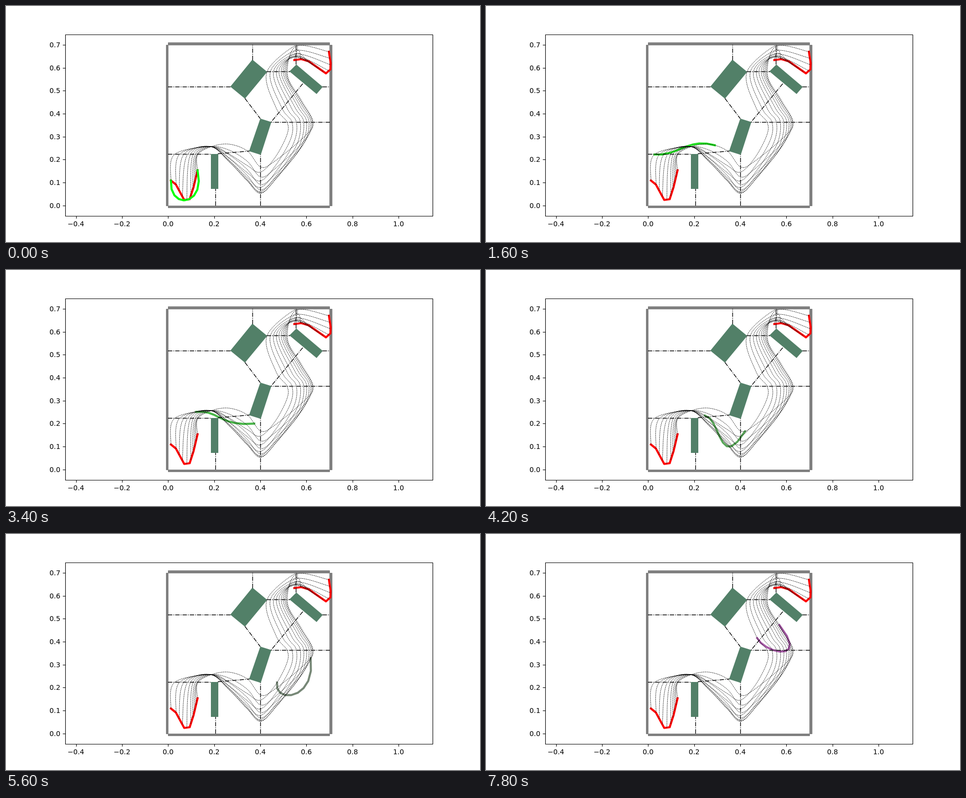
An HTML page with a canvas that plays this animation: 960 by 480 pixels, repeating every 8 s.

```html
<!DOCTYPE html>
<html lang="en">
<head>
<meta charset="utf-8">
<title>Rope path planning</title>
<style>
html, body { margin: 0; width: 100%; height: 100%; overflow: hidden; background: #fff; }
canvas { display: block; width: 100%; height: 100%; }
</style>
</head>
<body>
<canvas id="stage" width="960" height="480"></canvas>
<script>
const ctx = document.getElementById('stage').getContext('2d');
const LOOP = 8000, STEP = 200, COUNT = 10;
const PT = 100 / 72;

const range = (n, f) => Array.from({ length: n }, (_, i) => f(i));
const pairs = a => range(a.length / 2, i => [a[2 * i], a[2 * i + 1]]);
const mix = (a, b, p) => a + (b - a) * p;
const mixPt = (a, b, p) => a.map((v, i) => mix(v, b[i], p));
const snap = v => Math.floor(v + 0.5) + 0.5;
const dataX = v => 328.25 + v * 466.8;
const dataY = v => 405.8 - v * 466.8;

const SIZE = 0.7, WALL = 0.01;
const walls = [[-WALL, 0, 0, SIZE], [SIZE, 0, SIZE + WALL, SIZE],
  [0, SIZE, SIZE, SIZE + WALL], [0, -WALL, SIZE, 0]];

const obstacles = [
  [499, 109, 529, 134, 484, 188.5, 454.3, 164],
  [588, 119, 641.5, 164.5, 629, 179, 574, 133],
  [515, 229, 537.5, 236, 516, 302.7, 492.3, 295.3],
  [415, 301, 430, 301, 430, 372, 415, 372]
].map(pairs);

const passages = [
  [499.5, 110, 499.5, 79], [328, 164.5, 455, 164.5], [484, 188, 515, 229],
  [528, 133.5, 575, 133.5], [587.5, 119, 587.5, 79], [641, 164.5, 656, 164.5],
  [601, 158, 537, 236], [656, 236.5, 537, 236.5], [515.5, 406, 515.5, 302],
  [328, 301.5, 415, 301.5], [429, 300.5, 493, 295], [424.5, 406, 424.5, 372]
].map(pairs);

const startRope = pairs([334, 355, 344, 363, 361, 394.5, 372, 393, 380, 368, 388, 334]);
const goalRope = pairs([584, 110, 598, 108, 613, 112.5, 648, 137, 657, 129, 657.5, 116, 654, 93]);

// Where the first, middle and last strand pass; the others lie on a parabola
const gates = [
  [341, 302, 376, 303, 388, 303],
  [415, 286, 415, 286, 416, 286],
  [450, 300, 452, 316, 452, 281],
  [488, 324, 488, 354, 489, 295],
  [515, 338, 515, 381, 515, 327],
  [545, 308, 545, 354, 541, 318],
  [569, 262, 595, 287, 605, 265],
  [569, 236, 606, 236, 622, 236],
  [547, 207, 588, 205, 597, 190],
  [528, 135, 555, 134, 570, 140],
  [587, 80, 587, 104, 587, 82]
];

// Time, gate reached by each end, bend at the left and at the right end
const poses = [
  [0, 0, 0, -4, 60, 17, 74],
  [1200, 0.9, 2.95, 40, 10, -44, 0],
  [1600, 1, 3.3, 48, 4, -54, -16],
  [3400, 1.6, 4.5, 47, -4, -71, 6],
  [4200, 2.8, 5.45, 32, 5, -52, 84],
  [5000, 4.75, 6.6, -9, 33, -12, 90],
  [6400, 8, 8.45, -7, 56, 43, 82],
  [7800, 8.9, 9.1, 15, 31, 62, 78]
];

// Evenly spaced points along a polyline
function spread(pts, n) {
  const lens = pts.slice(1).map((p, i) => Math.hypot(p[0] - pts[i][0], p[1] - pts[i][1]));
  const total = lens.reduce((a, b) => a + b);
  return range(n, k => {
    let d = total * k / (n - 1), i = 0;
    while (i < lens.length - 1 && d > lens[i]) d -= lens[i++];
    return mixPt(pts[i], pts[i + 1], d / lens[i]);
  });
}

const quad = (a, m, b, u) =>
  a * (1 - u) * (1 - 2 * u) + m * 4 * u * (1 - u) + b * u * (2 * u - 1);

function bezier(a, b, c, d, t) {
  const q = 1 - t;
  return a.map((v, i) =>
    v * q ** 3 + 3 * b[i] * q * q * t + 3 * c[i] * q * t * t + d[i] * t ** 3);
}

const starts = spread(startRope, COUNT), goals = spread(goalRope, COUNT);
const strands = range(COUNT, i => {
  const u = i / (COUNT - 1);
  const mid = gates.map(g => [quad(g[0], g[2], g[4], u), quad(g[1], g[3], g[5], u)]);
  return [starts[i], ...mid, goals[i]];
});

// Catmull-Rom position; s counts the gates passed
function pointAt(pts, s) {
  const n = pts.length - 1;
  const i = Math.min(Math.floor(s), n - 1);
  const [a, b, c, d] = [pts[Math.max(i - 1, 0)], pts[i], pts[i + 1], pts[Math.min(i + 2, n)]];
  const out = b.map((v, k) => v + (c[k] - a[k]) / 6);
  const into = c.map((v, k) => v - (d[k] - b[k]) / 6);
  return bezier(b, out, into, c, s - i);
}

function ropeAt(t) {
  let i = 0;
  while (i < poses.length - 2 && poses[i + 1][0] <= t) i++;
  const a = poses[i], b = poses[i + 1];
  const [, l, r, lx, ly, rx, ry] = mixPt(a, b, (t - a[0]) / (b[0] - a[0]));
  const head = pointAt(strands[0], l), tail = pointAt(strands[COUNT - 1], r);
  const bendL = [head[0] + lx, head[1] + ly], bendR = [tail[0] + rx, tail[1] + ry];
  return range(COUNT, k => bezier(head, bendL, bendR, tail, k / (COUNT - 1)));
}

function trace(pts) {
  ctx.beginPath();
  pts.forEach(([x, y]) => ctx.lineTo(x, y));
}

function stroke(color, width, dash = [], cap = 'butt') {
  ctx.strokeStyle = color;
  ctx.lineWidth = width;
  ctx.lineCap = cap;
  ctx.lineJoin = 'round';
  ctx.setLineDash(dash);
  ctx.stroke();
}

function thick(pts, color) {
  trace(pts);
  stroke(color, 3 * PT, [], 'square');
}

function drawWall([x0, y0, x1, y1]) {
  const left = snap(dataX(x0)), top = snap(dataY(y1));
  ctx.beginPath();
  ctx.rect(left, top, snap(dataX(x1)) - left, snap(dataY(y0)) - top);
  ctx.fillStyle = '#808080';
  ctx.fill();
  stroke('#808080', 1);
}

function drawAxes() {
  const line = 0.8 * PT;
  ctx.fillStyle = '#000';
  ctx.font = `${10 * PT}px "DejaVu Sans", sans-serif`;
  ctx.textBaseline = 'alphabetic';
  ctx.textAlign = 'center';
  for (let i = -2; i <= 5; i++) {
    const x = dataX(i / 5);
    ctx.fillText((i / 5).toFixed(1).replace('-', '\u2212'), x, 448);
    trace([[snap(x), 427.5], [snap(x), 432.4]]);
    stroke('#000', line);
  }
  ctx.textAlign = 'right';
  for (let i = 0; i <= 7; i++) {
    const y = dataY(i / 10);
    ctx.fillText((i / 10).toFixed(1), 110, Math.round(y) + 5);
    trace([[115.1, snap(y)], [120, snap(y)]]);
    stroke('#000', line);
  }
  ctx.beginPath();
  ctx.rect(120.5, 58.5, 744, 369);
  stroke('#000', line);
}

function draw(t) {
  ctx.fillStyle = '#fff';
  ctx.fillRect(0, 0, 960, 480);
  walls.forEach(drawWall);
  ctx.fillStyle = '#528068';
  obstacles.forEach(o => { trace(o); ctx.fill(); });

  thick(startRope, '#f00');
  thick(goalRope, '#f00');
  const c = Math.round(255 * t / 12000);
  thick(ropeAt(t), `rgb(${c},${255 - c},${c})`);

  passages.forEach(p => {
    trace(p);
    stroke('#000', PT, [6.4, 1.6, 1, 1.6].map(d => d * PT));
  });
  strands.forEach(s => {
    trace(range((s.length - 1) * 8 + 1, k => pointAt(s, k / 8)));
    stroke('#000', 0.8, [2.6, 1.1]);
  });
  drawAxes();
}

let shown = -1;
function tick() {
  const t = Math.floor(performance.now() % LOOP / STEP) * STEP;
  if (t !== shown) draw(shown = t);
  requestAnimationFrame(tick);
}
tick();
</script>
</body>
</html>
```
